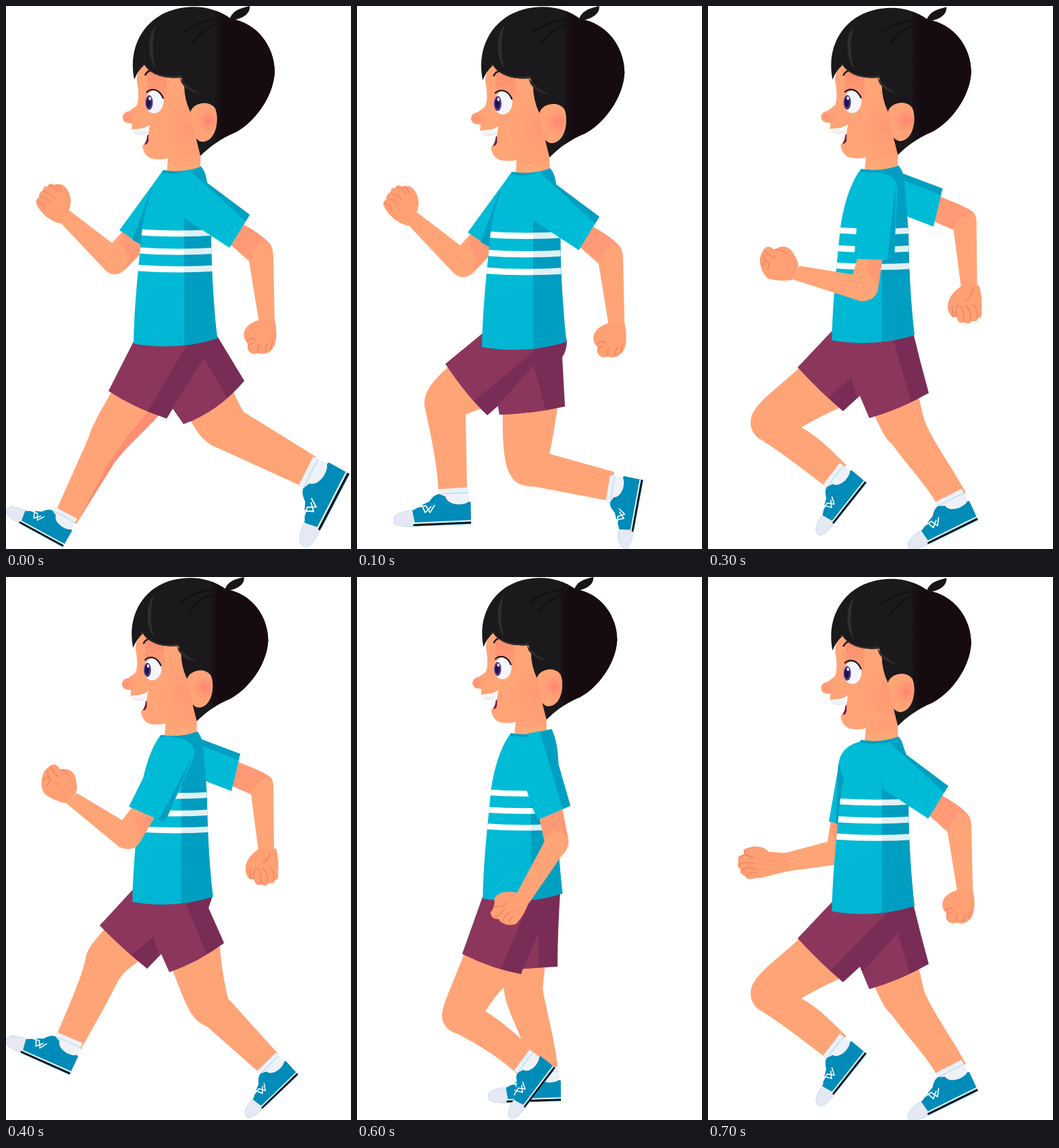
An HTML page with a canvas that plays this animation: 511 px wide and 804 px high, repeating every 0.8 s.

```html
<!DOCTYPE html>
<html>
<head>
<meta charset="utf-8">
<title>Walking boy</title>
<style>
html, body { margin: 0; height: 100%; overflow: hidden; background: #fff; }
canvas { display: block; }
</style>
</head>
<body>
<canvas id="stage" width="511" height="804"></canvas>
<script>
const ctx = document.getElementById('stage').getContext('2d');
const SKIN = '#ffa477', BLUSH = '#ff8c74', LINE = '#ec7d5d';
const TEAL = '#00bbd6', TEAL_DARK = '#009fc1', PLUM = '#8c365d', PLUM_DARK = '#792c55';

const fill = (d, color) => { ctx.fillStyle = color; ctx.fill(new Path2D(d)); };
const line = (d, color, width) => {
  ctx.strokeStyle = color;
  ctx.lineWidth = width;
  ctx.stroke(new Path2D(d));
};
const clipped = (d, draw) => {
  ctx.save();
  ctx.clip(new Path2D(d));
  draw();
  ctx.restore();
};
const ramp = (x0, y0, x1, y1, ...colors) => {
  const g = ctx.createLinearGradient(x0, y0, x1, y1);
  colors.forEach((c, i) => g.addColorStop(i / (colors.length - 1), c));
  return g;
};
const glow = (x, y, r, color, clear) => {
  const g = ctx.createRadialGradient(x, y, 0, x, y, r);
  g.addColorStop(0, color);
  g.addColorStop(1, clear);
  return g;
};
const oval = (x, y, rx, ry, color, tilt = 0) => {
  ctx.fillStyle = color;
  ctx.beginPath();
  ctx.ellipse(x, y, rx, ry, tilt, 0, 7);
  ctx.fill();
};

// Figure size and offset: [scale, x, y]
const BASE = [1, 0, 0], PASS = [.915, 22, 0], REACH = [.962, 5.5, 0],
      LAND = [1.01, -5.7, 0], SWING = [.952, 6.5, 0], RISE = [.987, -3, 1.5];

// Limbs are drawn in the view they were measured in
const between = (view, own, draw) => {
  const k = view[0] / own[0];
  ctx.save();
  ctx.setTransform(k, 0, 0, k, view[1] - own[1] * k, view[2] - own[2] * k);
  draw();
  ctx.restore();
};

const arms = {
  nearBack: { view: BASE,
    skin: 'M345,320Q375,335 391,352Q396,358 396,375L398,470 375,470 360,378 331,352Z',
    hand: 'M375,465C355,470 348,484 355,496Q360,500 358,508Q362,518 374,514Q390,519 398,502Q403,488 398,465Z',
    lines: 'M357,496Q366,488 370,496M358,506Q360,498 366,500M374,514Q371,506 376,501M385,513Q383,505 388,500M393,508Q392,500 396,496',
    shade: 'M345,320Q375,335 391,352Q370,345 362,375L331,352Z',
    sleeve: 'M255,247L290,240 298,262 361,309 331,358 264,314Z',
    trim: 'M274,245L290,240 298,262 361,309 355,319Z' },
  nearMid: { view: PASS,
    skin: 'M270,340L303,328 312,374Q315,386 302,399L256,466 237,455 278,378Z',
    hand: 'M207,458C215,446 235,449 243,452L256,464Q250,482 238,495Q228,499 219,494Q214,492 213,488Q203,490 201,479Q208,472 207,458Z',
    lines: 'M207,470Q218,473 226,464M205,487Q216,482 222,472M218,493Q220,484 229,478M228,496Q227,488 234,484',
    shade: 'M272,342L303,330 312,374Q296,350 278,374Z',
    sleeve: 'M255,224L288,218Q297,235 298,268L315,327 269,347C255,320 247,290 249,260Z',
    trim: 'M272,223L288,218Q297,235 298,268L315,327 304,332Z' },
  nearFront: { view: REACH,
    skin: 'M189,338L221,354 197,395Q186,408 168,400L88,334 105,320 172,360Z',
    hand: 'M53,300C55,285 62,283 66,279Q75,274 80,285C92,282 103,287 104,303Q107,315 102,322L88,335Q70,331 57,321Q51,312 53,300Z',
    lines: 'M62,285Q60,294 66,299Q64,305 60,309M66,280Q70,292 79,297M80,285Q90,287 94,297M55,302Q58,296 62,297',
    shade: 'M205,346L221,354 199,388Q199,372 190,363Z',
    sleeve: 'M236,235L262,240Q283,248 278,268L238,357 233,362 182,340 207,290Q215,252 236,235Z',
    trim: 'M278,262L238,357 233,362 226,359Z' },
  farFront: { view: BASE,
    skin: 'M176,330L157,351 93,302 80,320 148,392Q162,404 177,390L203,363 200,340Z',
    hand: 'M45,293Q43,286 49,283Q48,276 54,274Q56,265 62,267Q64,260 72,265C86,259 96,275 96,290Q95,306 80,322C65,318 52,308 45,293Z',
    lines: 'M45,289Q54,290 57,300M49,282Q60,283 66,291M54,274Q67,277 72,285M63,266Q74,266 77,276M72,265Q82,266 82,276',
    shade: 'M176,335L203,349 200,365 178,387Q184,365 170,350Z',
    sleeve: 'M230,247L168,332 203,355 225,300Z',
    trim: 'M216,268L203,355 187,346Z' },
  farLow: { view: RISE,
    skin: 'M182,360L177,392 98,413 101,438 205,424 205,362Z',
    hand: 'M53,404C65,396 83,398 90,407L120,409V435L92,442Q80,446 70,446Q58,450 54,442Q47,441 48,433Q42,429 45,422Q42,413 53,411Z',
    lines: 'M53,404Q56,414 66,415M45,416Q52,408 66,416M46,426Q56,420 70,425M49,435Q58,428 72,433M55,443Q62,436 74,438',
    shade: 'M182,362L205,366 204,384 188,393Z',
    sleeve: 'M228,243C203,249 194,262 193,282L179,362 210,369 215,280Z',
    trim: 'M193,276L203,304 196,367 189,365Z' },
  farBack: { view: REACH,
    skin: 'M341,273Q384,289 392,297Q397,302 396,315L397,407 374,407 363,322 334,309Z',
    hand: 'M374,403C360,412 351,426 356,440Q359,449 367,447Q370,459 378,455Q386,460 389,453Q398,455 398,449Q405,449 403,438Q405,420 400,402Z',
    lines: 'M362,432L361,446Q366,448 367,446M371,431Q365,433 367,446M371,431Q378,433 378,455M380,431Q387,433 388,453M390,430Q397,432 397,449M391,405Q391,418 379,424',
    shade: 'M341,273Q384,289 392,297Q372,300 362,320L334,309Z',
    sleeve: 'M282,238L347,262 334,317 295,302Z',
    trim: 'M284,238L347,262 344,271 288,249Z' }
};
arms.nearLow = { ...arms.nearFront, turn: -.38 };

const drawArm = (arm, view, shift = [0, 0]) => between(view, arm.view, () => {
  ctx.translate(...shift);
  if (arm.turn) {
    ctx.translate(262, 255);
    ctx.rotate(arm.turn);
    ctx.translate(-262, -255);
  }
  fill(arm.skin, SKIN);
  ctx.globalAlpha = .45;
  fill(arm.shade, BLUSH);
  ctx.globalAlpha = 1;
  fill(arm.hand, '#ff9f74');
  line(arm.lines, LINE, 1.1);
  fill(arm.sleeve, TEAL);
  fill(arm.trim, TEAL_DARK);
});

// Foot placed by toe tip and heel corner
const drawFoot = ([tx, ty, hx, hy]) => {
  const k = Math.hypot(hx - tx, hy - ty) / 114.2;
  ctx.save();
  ctx.translate(hx, hy);
  ctx.rotate(Math.atan2(hy - ty, hx - tx) - .061);
  ctx.scale(k, k);
  ctx.translate(-22, -31);
  fill('M-27,-21L19,-23 20,4 -14,6Z', '#eef1f8');
  line('M-26,-13Q-4,-16 19,-15', '#a9dcec', 1.2);
  const shoe = 'M-92,24C-92,12 -72,10 -62,9L-50,2 -39,-3Q-32,-13 -25,-14L-15,-10Q-13,0 3,2Q15,2 19,-2L22,-1V31L-63,33Q-89,34 -92,26Z';
  fill(shoe, '#008bb8');
  clipped(shoe, () => {
    fill('M-95,0L-64,8Q-63,18 -58,40H-95Z', '#e6e8f3');
    line('M-62,28.5L24,26', '#e8f4fa', 2.2);
    line('M-63,31.2L24,28.8', '#171318', 2.8);
  });
  line('M-58,5L-44,3 -38,13 -31,2M-51,0L-45,13 -36,4', '#fff', 1.7);
  ctx.restore();
};

const drawLeg = leg => {
  fill(leg.d, SKIN);
  if (leg.shade) fill(leg.shade, BLUSH);
  drawFoot(leg.foot);
};
const leg = (d, foot, shade) => ({ d, foot, shade });

const landFront = leg('M137,533C115,552 98,570 100,592C108,630 118,670 121,720L163,718 161,605Q172,600 185,596L205,560Z', [54, 762, 169, 767]);
const landBack = leg('M216,595C215,640 217,678 227,694C234,709 248,711 265,712L370,732 381,690 285,663Q292,630 298,588Z', [396, 803, 424, 702]);
const riseFront = leg('M138,533C110,560 80,580 68,600C58,616 64,635 80,643C115,665 145,690 175,712L205,680C180,655 160,635 138,624Q165,608 199,593Z', [163, 782, 235, 706]);
const riseBack = leg('M244,600C255,625 262,640 272,648C295,680 320,705 341,740L382,721C360,680 330,640 320,612L310,570Z', [297, 801, 400, 761]);
const landShorts = 'M187,484L131,530Q165,580 193,606L209,592 211,605Q265,603 308,593L304,520Q311,510 311,494Z';
const riseShorts = 'M185,480L133,535Q165,570 200,600L225,577 239,610Q285,597 327,573Q315,530 304,484Z';

const poses = [
  { view: BASE, near: 'nearBack', far: 'farFront',
    front: leg('M160,565C140,600 128,620 122,640L73,750 104,767 160,677C180,650 205,630 230,602Z', [1, 746, 84, 801],
      'M230,602C205,630 180,650 160,677L104,767 150,680C165,655 190,625 212,598Z'),
    back: leg('M271,610C285,635 295,648 315,655L438,711 460,668 352,601Q345,590 334,565Z', [441, 800, 509, 693]),
    shorts: 'M190,495L152,570Q190,595 238,611L247,596 263,619Q315,600 353,555L313,489Z',
    light: 'M180,480L140,575 206,607 270,498ZM293,521L332,588 263,630 246,596Z' },
  { view: LAND, near: 'nearBack', far: 'farFront', front: landFront, back: landBack, shorts: landShorts,
    light: 'M180,470L120,530 165,592 272,503ZM262,532L283,610 205,615 208,592Z' },
  { view: PASS, near: 'nearMid',
    front: leg('M230,550L230,580C236,610 244,642 260,675L292,748 328,737 296,633Q298,580 307,540Z', [252, 800, 343, 771]),
    back: leg('M180,525C172,550 166,572 174,584L180,590 229,688 262,675 250,630 230,570V540Z', [185, 743, 279, 712]),
    shorts: 'M195,455L172,526Q200,540 226,548L229,563Q275,560 314,546Q308,490 304,450Z',
    light: 'M180,440L160,535 220,580 289,575 275,455Z' },
  { view: RISE, near: 'nearLow', far: 'farBack', front: riseBack, back: riseFront, shorts: riseShorts,
    light: 'M180,470L120,535 162,595 212,550 232,620 305,600 272,485Z' },
  { view: REACH, near: 'nearFront', far: 'farBack',
    front: leg('M245,578C260,615 270,650 290,662Q297,664 305,672L373,732 403,706 329,624Q320,590 316,540Z', [356, 799, 433, 737]),
    back: leg('M147,520C130,540 120,550 118,565C110,600 90,640 74,682L111,699C130,665 145,640 165,600Q172,585 198,568Z', [0, 685, 94, 737]),
    shorts: 'M187,464L139,516Q170,548 209,580L230,558 242,585Q285,570 323,542L300,490 306,472Z',
    light: 'M180,450L120,516 164,578 218,533 238,600 303,573 265,480Z' },
  { view: LAND, near: 'nearFront', far: 'farBack', front: landBack, back: landFront, shorts: landShorts,
    light: 'M180,470L110,530 157,594 206,561 211,620 276,615 272,500Z' },
  { view: SWING, near: 'nearMid', shift: [4.5, -1.5],
    front: leg('M161,552C145,595 130,625 126,645C125,665 136,672 150,677C185,695 215,715 236,735L262,702C235,675 210,655 190,643Q205,620 217,608L234,580Z', [227, 801, 294, 727]),
    back: leg('M217,606C220,640 240,670 245,690L256,732 298,730C292,680 280,640 275,610L279,570 228,580Z', [194, 770, 302, 776]),
    shorts: 'M186,474L156,558Q200,580 243,588L246,580 297,577Q297,530 301,466Z',
    light: 'M180,460L145,565 209,591 257,477ZM269,527L268,590 247,590 246,580Z' },
  { view: RISE, near: 'nearBack', far: 'farLow', shift: [2.5, 3], front: riseFront, back: riseBack, shorts: riseShorts,
    light: 'M180,470L120,535 168,596 270,493ZM281,527L303,600 239,622 229,585Z' }
];

const drawHead = () => {
  fill('M242,205H288V246H238Z', ramp(0, 210, 0, 245, '#ff9a74', '#ffab78'));
  const face = 'M205,85C196,95 193,104 194,112C197,128 197,142 193,148L182,156C171,157 170,170 179,173L187,174 186,183 212,180 210,198 202,207C203,217 209,224 216,226Q232,229 245,224L288,208 290,110 250,90Z';
  fill(face, SKIN);
  clipped(face, () => {
    ctx.fillStyle = ramp(0, 95, 0, 150, 'rgba(255,125,105,.6)', 'rgba(255,125,105,0)');
    ctx.fillRect(209, 90, 29, 60);
    ctx.fillStyle = glow(272, 180, 42, 'rgba(255,135,110,.4)', 'rgba(255,135,110,0)');
    ctx.fillRect(225, 130, 70, 100);
    ctx.fillStyle = glow(180, 165, 16, 'rgba(255,130,110,.4)', 'rgba(255,130,110,0)');
    ctx.fillRect(165, 150, 35, 35);
  });
  fill('M186,183Q202,184 213,176L211,188Q201,193 192,190Q187,188 186,183Z', ramp(0, 180, 0, 192, '#fff', '#e9e6ec'));
  fill('M211,190L211,200Q209,206 205,205Q209,198 209,192Z', '#6d2140');
  oval(220, 142, 13.5, 17, '#f5f6fd', .1);
  oval(212, 143, 5.5, 11, '#50388a');
  oval(211.5, 143, 3.4, 7.5, '#24124c');
  oval(213, 137, 1.8, 2.5, '#fff');
  line('M208,128C215,121 227,122 233,137', '#17121a', 2.2);
  line('M206,103Q208,97 215,95', '#17121a', 2.4);
  const hair = 'M190,109C180,60 205,17 250,5C280,-3 310,2 333,19C372,25 398,60 398,98C396,135 368,172 340,187C318,196 302,208 288,222L282,198 286,172 273,157Q264,138 264,118L260,106C240,108 217,105 205,87Q195,96 190,109Z';
  fill(hair, '#1b191b');
  clipped(hair, () => {
    ctx.fillStyle = ramp(305, 0, 322, 0, '#1a1719', '#160b11');
    ctx.fillRect(310, 0, 90, 225);
    fill('M222,28C207,45 211,80 222,92Q213,62 222,28Z', '#2e2e2b');
    line('M203,85C213,104 240,108 260,104', '#30302c', 3);
    line('M275,57Q288,35 313,27M262,40Q285,20 320,20', '#121113', 3);
  });
  fill('M252,90Q254,112 286,129Q271,129 260,114Z', '#2c2c2a');
  fill('M331,20C336,5 350,3 361,0Q362,15 338,21Z', '#191516');
  const ear = 'M273,157C277,143 301,138 310,152C316,167 312,198 293,201Q282,202 279,188Z';
  fill(ear, SKIN);
  clipped(ear, () => oval(296, 172, 18, 23, glow(300, 170, 20, 'rgba(255,120,110,.75)', 'rgba(255,140,115,0)')));
};

const drawShirt = () => {
  const shirt = 'M233,243Q262,248 289,238C296,246 298,258 299,275L304,340C304,390 308,450 313,492Q255,511 189,500C190,440 197,380 201,338C205,300 218,260 233,243Z';
  fill(shirt, TEAL);
  clipped(shirt, () => {
    ctx.fillStyle = ramp(190, 380, 230, 510, 'rgba(0,170,205,0)', 'rgba(0,170,205,.35)');
    ctx.fillRect(185, 380, 80, 130);
    ctx.fillStyle = TEAL_DARK;
    ctx.fillRect(264, 230, 60, 285);
    for (const y of [334.5, 361.5, 387.5]) line(`M190,${y}Q255,${y + 5} 320,${y}`, '#fff', 9);
    ctx.fillStyle = 'rgba(0,130,170,.12)';
    ctx.fillRect(264, 325, 60, 75);
  });
  line('M232,245Q262,250 290,240', TEAL_DARK, 4);
};

const drawPose = ({ view, near, far, shift, front, back, shorts, light }) => {
  ctx.setTransform(1, 0, 0, 1, 0, 0);
  ctx.fillStyle = '#fff';
  ctx.fillRect(0, 0, 511, 804);
  if (far) drawArm(arms[far], view);
  drawLeg(back);
  drawLeg(front);
  fill(shorts, PLUM_DARK);
  clipped(shorts, () => fill(light, PLUM));
  between(view, BASE, () => { drawHead(); drawShirt(); });
  drawArm(arms[near], view, shift);
};

const start = performance.now();
const tick = () => {
  const t = performance.now() - start;
  drawPose(poses[Math.floor(t / 100) % poses.length]);
  requestAnimationFrame(tick);
};
tick();
</script>
</body>
</html>
```
